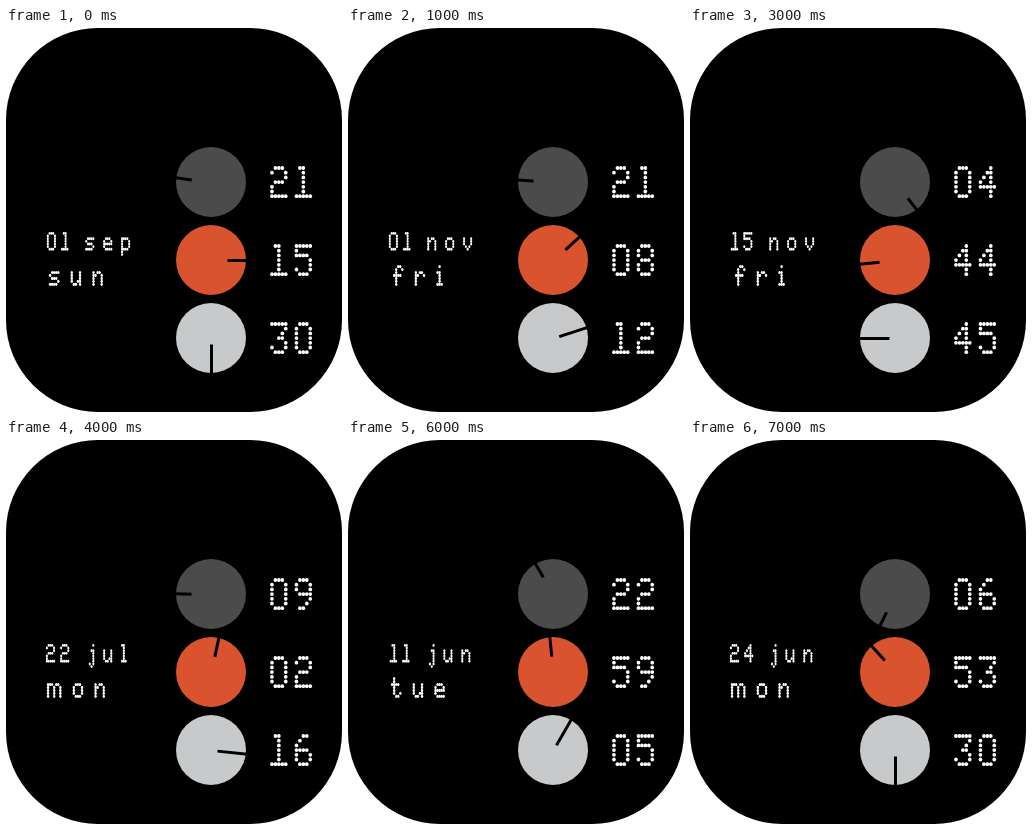
Write an HTML page with a canvas that moves like this. It is 336 px wide and 384 px high and loops after 8000 ms.

```html
<!DOCTYPE html>
<html lang="en">
<head>
<meta charset="utf-8">
<title>Three-dial watch face</title>
<style>
  html, body { margin: 0; width: 100%; height: 100%; overflow: hidden; background: #fff; }
  canvas { display: block; width: 336px; height: 384px; }
</style>
</head>
<body>
<canvas id="face" width="336" height="384" role="img"></canvas>
<script>
const canvas = document.getElementById('face');
const ctx = canvas.getContext('2d');

// Dot-matrix glyphs, one string per row from the ascender line down.
const GLYPHS = {
  0: '.###. #...# #...# #...# #...# #...# .###.',
  1: '.##.. ..#.. ..#.. ..#.. ..#.. ..#.. #####',
  2: '.###. #...# ....# .###. #.... #.... #####',
  3: '##### ....# ...#. ..##. ....# #...# .###.',
  4: '...#. ..##. .#.#. #..#. ##### ...#. ...#.',
  5: '##### #.... ####. ....# ....# #...# .###.',
  6: '..##. .#... #.... ####. #...# #...# .###.',
  7: '##### ....# ...#. ..#.. ..#.. ..#.. ..#..',
  8: '.###. #...# #...# .###. #...# #...# .###.',
  9: '.###. #...# #...# .#### ....# ...#. .##..',
  slimOne: '.##. ..#. ..#. ..#. ..#. ..#. ####',
  a: '. . .###. ....# .#### #...# .####',
  e: '. . .###. #...# ##### #.... .####',
  f: '..##. .#..# .#... ####. .#... .#... .#...',
  h: '#.... #.... #.##. ##..# #...# #...# #...#',
  i: '.#. ... ##. .#. .#. .#. ###',
  j: '..# ... .## ..# ..# ..# ..# #.# .#.',
  l: '##. .#. .#. .#. .#. .#. ###',
  m: '. . ###.##. #..#..# #..#..# #..#..# #..#..#',
  n: '. . #.##. ##..# #...# #...# #...#',
  o: '. . .###. #...# #...# #...# .###.',
  p: '. . ####. #...# #...# #...# ####. #.... #....',
  r: '. . #.##. ##..# #.... #.... #....',
  s: '. . .#### #.... .###. ....# ####.',
  t: '.#... .#... ####. .#... .#... .#..# ..##.',
  u: '. . #...# #...# #...# #..## .##.#',
  v: '. . #...# #...# #...# .#.#. ..#..',
  y: '. . #...# #...# #...# #..## .##.# ....# .###.'
};
for (const key in GLYPHS) GLYPHS[key] = GLYPHS[key].split(' ');

// dx, dy: dot pitch; rx, ry: dot radii
const SMALL = { dx: 1.78, dy: 2.65, rx: 1.05, ry: 1.45, slim: true };
const MEDIUM = { dx: 2.05, dy: 2.95, rx: 1.2, ry: 1.6, slim: true };
const LARGE = { dx: 3.45, dy: 4.7, rx: 1.85, ry: 1.9 };

const DIALS = [
  { y: 154, color: '#4b4b4b', inner: 20 },
  { y: 232, color: '#d9532f', inner: 16 },
  { y: 310, color: '#c8c9cb', inner: 6 }
];
const DIAL_X = 205, RADIUS = 35, STEP = 1000;

// day, month, weekday, hour, minute, second
const STATES = [
  ['01', 'sep', 'sun', 21, 15, 30],
  ['01', 'nov', 'fri', 21, 8, 12],
  ['19', 'sep', 'thu', 10, 25, 44],
  ['15', 'nov', 'fri', 4, 44, 45],
  ['22', 'jul', 'mon', 9, 2, 16],
  ['03', 'may', 'fri', 9, 1, 52],
  ['11', 'jun', 'tue', 22, 59, 5],
  ['24', 'jun', 'mon', 6, 53, 30]
];

function disc(x, y, rx, ry = rx) {
  ctx.beginPath();
  ctx.ellipse(x, y, rx, ry, 0, 0, Math.PI * 2);
  ctx.fill();
}

// Proportional dot text centred on cx; y is the centre of the top row.
function dotText(text, cx, y, font, gap) {
  const glyphs = [...text].map(c => GLYPHS[c === '1' && font.slim ? 'slimOne' : c]);
  const widths = glyphs.map(g => (g[6].length - 1) * font.dx + 2 * font.rx);
  let x = cx - (widths.reduce((a, b) => a + b) + gap * (text.length - 1)) / 2;
  ctx.fillStyle = '#fff';
  glyphs.forEach((rows, i) => {
    rows.forEach((row, r) => [...row].forEach((dot, c) => {
      if (dot === '#') disc(x + font.rx + c * font.dx, y + r * font.dy, font.rx, font.ry);
    }));
    x += widths[i] + gap;
  });
}

function drawDial({ y, color, inner }, degrees) {
  ctx.fillStyle = color;
  disc(DIAL_X, y, RADIUS);
  ctx.save();
  ctx.translate(DIAL_X + 0.5, y + 0.5);
  ctx.rotate(degrees * Math.PI / 180);
  ctx.fillStyle = '#000';
  ctx.fillRect(-1.5, -RADIUS - 1, 3, RADIUS + 1 - inner);
  ctx.restore();
}

function draw([day, month, weekday, h, m, s]) {
  ctx.clearRect(0, 0, 336, 384);
  ctx.fillStyle = '#000';
  ctx.beginPath();
  ctx.roundRect(0, 0, 336, 384, 92);
  ctx.fill();

  const angles = [h % 12 * 30 + m / 2, m * 6, s * 6];
  const values = [h, m, s].map(v => String(v).padStart(2, '0'));
  DIALS.forEach((dial, i) => {
    drawDial(dial, angles[i]);
    dotText(values[i], 285.1, dial.y - 14, LARGE, 7);
  });
  dotText(day, 51.6, 205.4, SMALL, 5);
  dotText(month, 101.7, 205.4, SMALL, 8.7);
  dotText(weekday, 69.9, 238.6, MEDIUM, 11.1);
  canvas.setAttribute('aria-label', `${day} ${month} ${weekday} ${values.join(':')}`);
}

const start = performance.now();
let shown = -1;
function tick(now) {
  const i = Math.floor(Math.max(0, now - start) / STEP) % STATES.length;
  if (i !== shown) draw(STATES[shown = i]);
  requestAnimationFrame(tick);
}
tick(start);
</script>
</body>
</html>
```
